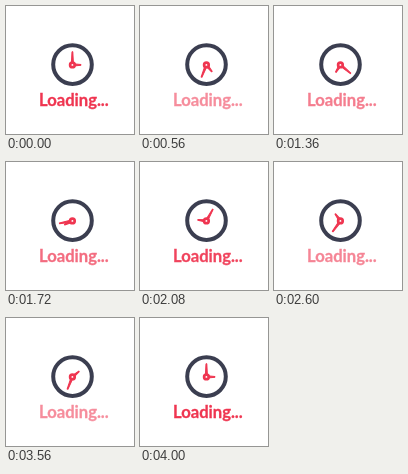
These frames come from a looping animation (128x128 px, 4040 ms). An HTML page:

```html
<!DOCTYPE html>
<html lang="en">
<head>
<meta charset="utf-8">
<title>Loading</title>
<style>
  html, body { margin: 0; width: 100%; height: 100%; overflow: hidden; background: #fff; }
  svg { display: block; width: 100%; height: 100%; }
  text { font: 700 16.6px Lato, sans-serif; fill: #ef3550; stroke: #ef3550; stroke-width: .3; }
  .hands { fill: #ef3550; stroke: #ef3550; stroke-linejoin: round; }
</style>
</head>
<body>
<svg viewBox="0 0 128 128">
  <circle cx="66.5" cy="58.6" r="19.3" fill="#fff" stroke="#3b3e50" stroke-width="4"/>
  <g class="hands" transform="translate(66.4 58.9)">
    <path id="hour" d="M-1 -2L-.4 -8.6H.4L1 -2Z"/>
    <path id="minute" d="M-1 -2L-.4 -13.2H.4L1 -2Z"/>
    <circle r="2.3" fill="#fff" stroke-width="2.7"/>
  </g>
  <text id="label" x="33" y="99.6">Loading...</text>
</svg>
<script>
  const LOOP = 4040, STEP = 40, TURN = 4000, PULSE = 1000;
  const hour = document.getElementById('hour');
  const minute = document.getElementById('minute');
  const label = document.getElementById('label');

  const rotate = (hand, degrees) => hand.setAttribute('transform', `rotate(${degrees})`);

  function render(ms) {
    const time = Math.floor((ms % LOOP) / STEP) * STEP;
    const turn = time / TURN;
    rotate(hour, 90 + 360 * turn);
    rotate(minute, 4 * 360 * turn);
    // Linear fade from full to half opacity and back
    const phase = (time % PULSE) / PULSE;
    label.setAttribute('opacity', 0.5 + Math.abs(phase - 0.5));
  }

  const start = performance.now();
  function tick() {
    render(performance.now() - start);
    requestAnimationFrame(tick);
  }
  tick();
</script>
</body>
</html>
```
